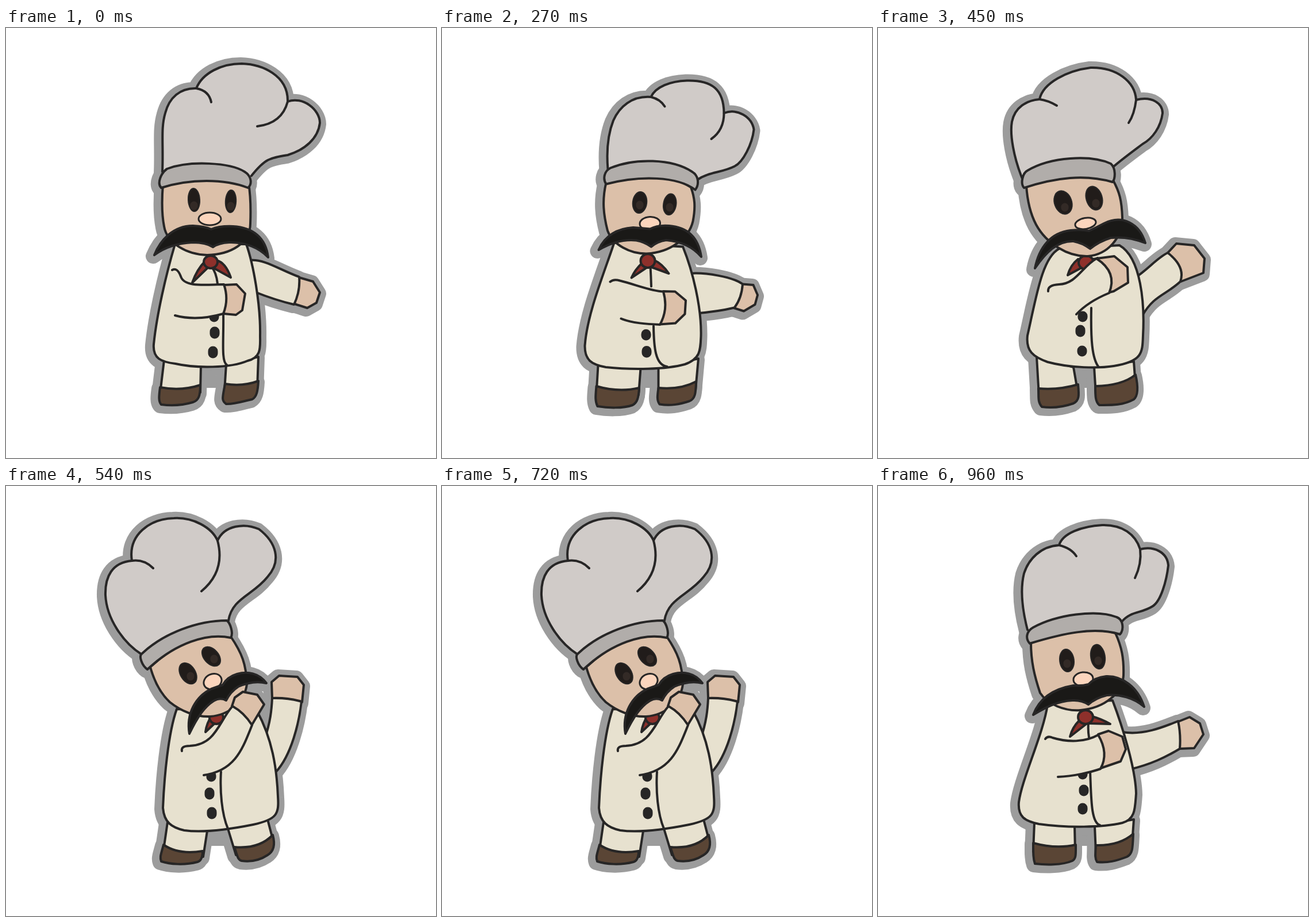
An HTML page without scripts for the animation above (1110 ms loop, 748 px wide and 748 px high).

```html
<!DOCTYPE html>
<html lang="en">
<head>
<meta charset="utf-8">
<title>Dancing chef</title>
<style>
html, body { margin: 0; height: 100%; overflow: hidden; background: #fff; }
svg { display: block; width: 100%; height: 100%; }
path {
  stroke: #272626; stroke-width: 4; stroke-linecap: round; stroke-linejoin: round;
  animation: dance 1110ms step-end infinite;
}
.halo { fill: #9c9c9c; }
.halo path { fill: #9c9c9c; stroke: #9c9c9c; stroke-width: 26; }

/* Poses: a upright, b bowed right, c open arm, d leaning left, e rising */
@keyframes dance {
  0% { d: var(--a); }
  2.703% { d: var(--a); animation-timing-function: steps(1, jump-both); }
  10.811% { d: var(--b); }
  24.324% { d: var(--b); animation-timing-function: steps(1, jump-both); }
  32.432% { d: var(--c); }
  35.135% { d: var(--e); }
  45.946% { d: var(--e); animation-timing-function: steps(1, jump-both); }
  48.649% { d: var(--d); }
  /* overshoot the lean */
  56.757% { d: var(--e); animation-timing-function: linear(1.2, 1.2); }
  64.865% { d: var(--d); }
  70.27% { d: var(--d); animation-timing-function: steps(1, jump-both); }
  75.676% { d: var(--e); }
  86.486%, 100% { d: var(--c); }
}

.hat {
  fill: #d0cbc8;
  --a: path("M272 250C274 200 269 175 277 148C284 121 303 104 331 105C342 78 375 62 410 62C445 63 491 82 490 128C516 118 546 142 546 165C543 192 520 212 490 221C458 226 450 228 427 257");
  --b: path("M317 241C321 215 330 190 342 170C355 147 378 130 412 137C422 122 440 115 462 115C515 114 532 130 525 186C548 174 575 195 580 215C577 240 555 267 540 272C515 282 490 283 466 291");
  --c: path("M260 250C251 215 247 180 254 152C262 127 283 105 315 103C321 82 355 70 390 68C425 67 448 84 456 110C480 104 503 115 505 138C502 165 492 200 478 209C458 222 440 217 424 236");
  --d: path("M236 293C203 272 175 230 173 190C172 157 185 133 219 130C212 85 250 57 292 56C325 54 358 72 368 95C380 68 415 64 440 75C470 98 480 130 455 158C430 190 393 195 387 234");
  --e: path("M251 262C236 225 229 185 233 163C238 138 258 126 281 124C287 95 330 74 370 69C415 68 447 93 449 125C478 118 495 132 495 148C492 172 478 192 460 202C440 217 425 228 411 240");
}
.curls {
  fill: none;
  --a: path("M331 105Q353 109 357 129M490 128Q480 166 437 171");
  --b: path("M412 137Q424 140 430 151M525 186Q522 220 490 226");
  --c: path("M315 103Q336 108 345 122M456 110Q459 135 447 160");
  --d: path("M219 130Q240 127 256 143M368 95Q382 148 340 183");
  --e: path("M281 124Q296 126 311 135M449 125Q446 150 436 165");
}
.band {
  fill: #b1adaa;
  --a: path("M270 278C262 270 270 252 280 245C320 230 390 234 415 250C428 258 428 272 421 278C380 262 320 262 270 278Z");
  --b: path("M307 269C303 260 306 245 316 241C360 228 420 240 455 272C467 282 467 295 460 305C445 272 370 255 307 269Z");
  --c: path("M264 274C256 265 258 253 270 246C310 224 380 214 415 228C427 232 428 250 421 258C375 244 320 257 264 274Z");
  --d: path("M246 319C236 312 231 296 236 292C275 255 335 234 384 234C390 238 396 256 391 264C350 255 295 273 246 319Z");
  --e: path("M254 278C247 270 252 252 260 248C300 224 370 220 405 236C414 244 413 262 408 268C360 254 310 260 254 278Z");
}
.head {
  fill: #dcc0a9;
  --a: path("M273 272C270 310 272 330 275 345C280 375 315 394 350 395C390 394 425 375 425 340C426 315 426 295 422 270Q348 250 273 272Z");
  --b: path("M305 266C290 295 290 320 294 345C300 375 330 394 360 395C400 395 435 370 446 342C455 320 455 310 453 298Q390 235 305 266Z");
  --c: path("M266 272C266 305 272 330 282 360C295 380 325 392 352 390C395 386 425 360 427 330C428 300 424 280 413 256Q340 235 266 272Z");
  --d: path("M251 315C258 340 268 360 285 376C305 392 330 402 355 401C390 398 415 375 419 345C418 310 410 290 391 262Q320 250 251 315Z");
  --e: path("M258 274C260 305 266 325 275 342C293 375 330 398 365 397C400 394 425 365 425 330C424 300 420 285 409 265Q330 240 258 274Z");
}
/* Unit radii: each arc scales up to the span between its ends */
.eyes {
  fill: #211c1a; stroke-width: 2;
  --a: path("M326 279A.5 1 -3 1 1 328 319A.5 1 -3 1 1 326 279M392 282A.47 1 3 1 1 390 321A.47 1 3 1 1 392 282");
  --b: path("M366 286A.68 1 20 1 1 353 321A.68 1 20 1 1 366 286M418 301A.62 1 27 1 1 402 332A.62 1 27 1 1 418 301");
  --c: path("M326 284A.63 1 -7 1 1 331 323A.63 1 -7 1 1 326 284M379 276A.58 1 -9 1 1 386 318A.58 1 -9 1 1 379 276");
  --d: path("M306 309A.65 1 -32 1 1 327 343A.65 1 -32 1 1 306 309M344 282A.65 1 -42 1 1 370 311A.65 1 -42 1 1 344 282");
  --e: path("M315 284A.72 1 -20 1 1 329 323A.72 1 -20 1 1 315 284M370 276A.66 1 -17 1 1 382 316A.66 1 -17 1 1 370 276");
}
.shine {
  stroke: #332a26; stroke-width: 13;
  --a: path("M327 308v2M391 309v2");
  --b: path("M359 306v2M409 319v2");
  --c: path("M329 308v2M383 303v2");
  --d: path("M321 330v2M362 300v2");
  --e: path("M325 311v2M379 304v2");
}
.nose {
  fill: #fbd5bd; stroke-width: 3;
  --a: path("M335 332A1 .56 0 1 1 374 332A1 .56 0 1 1 335 332");
  --b: path("M348 344A1 .6 0 1 1 385 344A1 .6 0 1 1 348 344");
  --c: path("M340 338A1 .7 -7 1 1 374 334A1 .7 -7 1 1 340 338");
  --d: path("M345 347A1 .8 -25 1 1 374 333A1 .8 -25 1 1 345 347");
  --e: path("M343 343A1 .52 -10 1 1 379 337A1 .52 -10 1 1 343 343");
}
.stache {
  fill: #1a1917;
  --a: path("M258 395C268 370 290 344 325 344Q345 345 357 350Q372 344 395 345C430 347 452 365 456 399C440 382 415 372 388 373Q370 374 360 381Q348 373 325 373C300 374 278 380 258 395Z");
  --b: path("M275 374C285 355 302 345 325 347Q343 349 358 354Q373 352 393 357C428 363 440 378 439 412C425 390 405 380 382 374Q370 374 362 381Q350 372 338 366C318 360 295 363 275 374Z");
  --c: path("M270 398C282 366 310 352 340 347Q355 348 366 345Q377 333 397 331C425 330 452 350 463 384C445 368 420 362 398 364Q378 369 366 380Q354 372 338 373C312 374 290 386 270 398Z");
  --d: path("M319 431C313 396 330 366 357 353Q368 349 377 346Q385 332 402 327C420 322 440 325 453 343C437 339 420 342 404 349Q390 358 383 373Q373 367 361 374C345 384 333 402 319 431Z");
  --e: path("M273 418C280 382 300 356 335 352Q355 350 367 353Q380 347 393 340C425 324 455 340 465 374C445 366 425 363 405 365Q385 371 369 384Q356 374 340 371C312 370 292 390 273 418Z");
}
.coat {
  fill: #e7e1cf;
  --a: path("M294 376C278 430 262 500 257 550C255 575 270 581 295 584C330 592 390 592 420 579C445 573 442 555 442 535C443 480 430 410 418 376Z");
  --b: path("M304 367C275 425 255 485 252 555C253 580 265 588 290 592C330 595 390 594 420 584C452 570 452 560 452 535C455 480 448 430 430 388Z");
  --c: path("M295 380C288 430 250 510 245 550C243 575 255 583 280 588C330 595 390 594 425 586C448 580 447 560 449 535C448 490 424 415 408 373Z");
  --d: path("M297 388C282 430 275 510 273 560C275 585 288 594 310 599C345 604 395 596 430 589C472 580 475 570 473 540C471 490 463 440 437 392Z");
  --e: path("M315 384C285 400 275 470 260 535C257 562 270 572 295 581C335 592 385 592 410 588C460 580 460 565 461 535C464 480 458 400 420 378Z");
}
.seam {
  fill: none;
  --a: path("M357 415Q366 425 368 445M378 497C379 540 374 580 384 586");
  --b: path("M359 415Q362 440 361 462M367 540C366 570 372 588 397 588");
  --c: path("M366 412Q365 425 367 437M369 497C371 540 370 585 386 590");
  --d: path("M385 425Q385 430 385 435M374 497C372 530 375 570 386 596");
  --e: path("M380 420Q380 425 380 430M371 487C370 540 372 575 384 590");
}
.buttons {
  stroke-width: 17;
  --a: path("M362 501v2M363 528v4M360 562v4");
  --b: path("M365 512v2M352 537v2M356 563v4");
  --c: path("M356 501v1M358 528v3M356 560v3");
  --d: path("M357 504v2M354 533v4M358 567v4");
  --e: path("M356 501v2M352 525v4M355 561v2");
}
.tails {
  fill: #8e302b;
  --a: path("M347 405Q332 420 324 443L352 416ZM366 404Q382 408 391 434L362 418Z");
  --b: path("M346 410Q334 420 325 433L352 418ZM364 406Q378 415 385 440L358 418Z");
  --c: path("M350 408Q338 420 334 436L361 415ZM373 401Q388 405 404 414L368 413Z");
  --d: path("M358 400Q349 412 347 428L364 412ZM370 400Q375 405 375 412L365 412Z");
  --e: path("M348 402Q335 412 330 430L356 416ZM372 402Q380 402 382 400L368 413Z");
}
.knot {
  fill: #8e302b;
  --a: path("M344 407A1 .92 0 1 1 368 407A1 .92 0 1 1 344 407");
  --b: path("M343 408A1 1 0 1 1 367 408A1 1 0 1 1 343 408");
  --c: path("M348 402A1 .92 0 1 1 374 402A1 .92 0 1 1 348 402");
  --d: path("M354 403A1 .92 0 1 1 378 403A1 .92 0 1 1 354 403");
  --e: path("M349 408A1 .92 0 1 1 375 408A1 .92 0 1 1 349 408");
}
.sleeve {
  fill: #e7e1cf;
  --a: path("M289 421Q298 416 304 432C310 452 350 446 379 446Q388 472 378 497C350 505 320 507 294 500");
  --b: path("M294 443Q302 438 315 441C345 447 370 470 387 484Q386 515 371 540C345 532 320 522 310 505");
  --c: path("M291 440Q295 434 304 438C330 446 360 446 383 433Q402 465 387 492C370 498 340 505 313 506");
  --d: path("M306 461Q304 452 320 452C365 450 370 410 394 383Q414 394 428 416C412 455 400 495 344 503");
  --e: path("M296 458Q295 447 315 446C345 445 355 415 380 401Q417 425 402 461C380 470 360 482 345 498");
}
.hand {
  fill: #dcc0a9;
  --a: path("M380 447L401 446L416 462L411 491L400 499L379 497Z");
  --b: path("M387 484L410 491L423 512L414 537L390 548L371 540Z");
  --c: path("M383 432L401 426L425 436L431 458L422 479L387 491Z");
  --d: path("M393 383L398 368L412 358L437 363L449 380L428 415Z");
  --e: path("M380 401L411 397L434 416L435 443L410 458L402 460Z");
}
.far-sleeve {
  fill: #e7e1cf;
  --a: path("M425 404C450 402 475 420 510 433Q512 458 501 481C475 475 450 466 430 458");
  --b: path("M438 426C455 416 515 445 524 482Q515 510 492 516C480 510 465 504 445 500");
  --c: path("M425 428C460 434 495 420 522 409Q527 432 525 457C500 472 475 484 438 493");
  --d: path("M450 440C460 410 462 390 463 369Q490 368 514 375C510 410 497 468 469 498");
  --e: path("M445 436C470 420 485 400 504 391Q535 415 526 441C500 465 480 465 460 500");
}
.far-hand {
  fill: #dcc0a9;
  --a: path("M510 434L534 441L546 460L540 478L524 487L502 480Z");
  --b: path("M524 481L541 492L538 516L523 530L500 529L490 517Z");
  --c: path("M522 410L542 402L560 413L566 432L550 456L525 457Z");
  --d: path("M463 369L462 341L475 330L507 332L518 346L515 376Z");
  --e: path("M504 391L519 375L550 378L568 401L566 426L527 441Z");
}
.legs {
  fill: #e7e1cf;
  --a: path("M275 578L268 636L338 634L339 588ZM383 585L380 632L437 628L439 572Z");
  --b: path("M271 588L267 638L341 640L349 592ZM376 590L374 638L440 638L447 570Z");
  --c: path("M272 586L270 636L343 636L342 592ZM377 592L379 638L442 622L445 580Z");
  --d: path("M281 585L273 640L343 645L350 600ZM386 596L400 642L466 622L455 580Z");
  --e: path("M276 572L280 640L348 636L340 590ZM376 590L379 638L448 622L445 580Z");
}
.shoes {
  fill: #5a4535;
  --a: path("M268 625Q305 632 338 621C338 640 335 648 325 651C305 657 285 657 270 655C265 650 266 640 268 625ZM381 619Q412 624 439 614C438 632 436 642 428 646C410 650 395 655 383 654C374 648 377 642 381 619Z");
  --b: path("M267 625Q305 637 342 628C340 645 335 655 325 660C310 664 285 663 268 659C262 650 264 640 267 625ZM374 627Q410 633 440 625C440 640 438 650 428 653C410 658 395 659 376 655C370 648 371 640 374 627Z");
  --c: path("M270 621Q310 632 344 624C344 640 345 648 338 652C320 660 290 659 273 657C270 648 270 640 270 621ZM379 625Q420 626 444 605C443 630 443 640 433 645C415 652 400 656 381 654C377 648 378 640 379 625Z");
  --d: path("M274 624Q300 642 342 635C342 645 340 652 333 654C310 660 285 658 270 653C267 645 270 640 274 624ZM397 628Q440 632 464 607C469 625 465 636 455 642C440 652 425 654 410 652C402 650 402 640 397 628Z");
  --e: path("M279 627Q315 630 348 620C350 640 350 648 340 653C320 660 300 661 285 659C277 650 280 640 279 627ZM378 623Q425 622 448 603C453 625 452 640 445 646C425 657 405 656 385 656C378 650 378 640 378 623Z");
}
</style>
</head>
<body>
<svg viewBox="0 0 748 748">
  <g class="halo" transform="translate(-2 2)">
    <rect x="339" y="578" width="54" height="46"/>
    <path class="far-hand"/>
    <path class="far-sleeve"/>
    <path class="legs"/>
    <path class="shoes"/>
    <path class="coat"/>
    <path class="head"/>
    <path class="hat"/>
    <path class="band"/>
    <path class="stache"/>
    <path class="hand"/>
  </g>
  <path class="far-hand"/>
  <path class="far-sleeve"/>
  <path class="legs"/>
  <path class="shoes"/>
  <path class="coat"/>
  <path class="seam"/>
  <path class="buttons"/>
  <path class="tails"/>
  <path class="knot"/>
  <path class="head"/>
  <path class="hat"/>
  <path class="curls"/>
  <path class="band"/>
  <path class="eyes"/>
  <path class="shine"/>
  <path class="nose"/>
  <path class="stache"/>
  <path class="hand"/>
  <path class="sleeve"/>
</svg>
</body>
</html>
```
